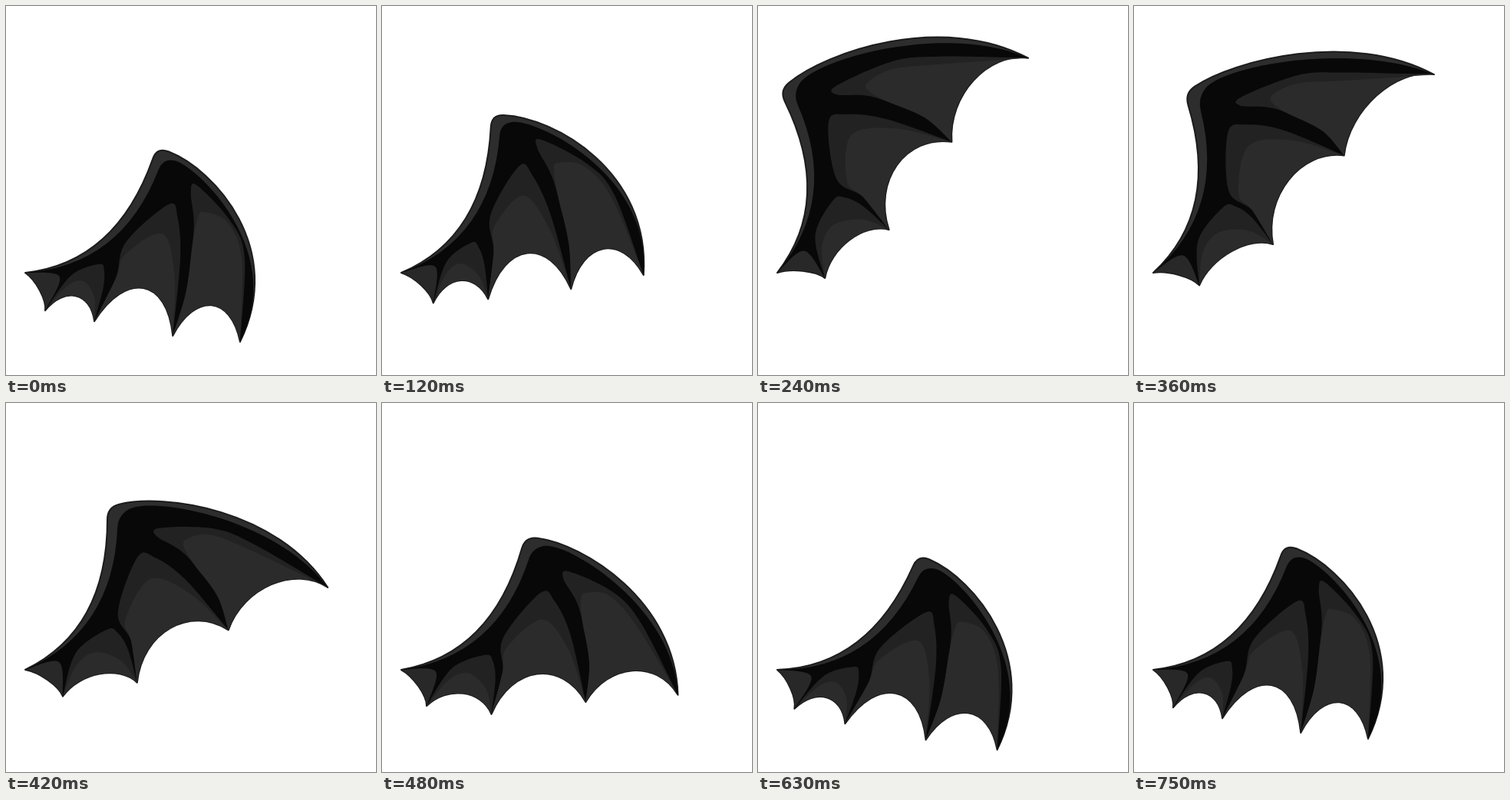
Recreate the animation shown at these times as an HTML page with a canvas. Size 482x480 px, loop 0.78 s.

```html
<!DOCTYPE html>
<html>
<head>
<meta charset="utf-8">
<style>
  html, body { margin: 0; background: #fff; overflow: hidden; }
  canvas { display: block; }
</style>
</head>
<body>
<canvas id="stage" width="482" height="480"></canvas>
<script>
const ctx = document.getElementById('stage').getContext('2d');
const root = [25, 347];
const LOOP = 780, CYCLE = 750, STEP = 30;
const BLACK = '#080808', DARK = '#222', LIGHT = '#2b2b2b', EDGE = '#2d2d2d';

// The beat has two parts: how far the wing is raised and how far it is spread
const beat = [
  { time: 0, flap: 0, spread: 0 },
  { time: 120, flap: .4, spread: -.48 },
  { time: 240, flap: 1, spread: 0 },
  { time: 360, flap: .74, spread: .78 },
  { time: 480, flap: 0, spread: 1 },
  { time: 630, flap: -.127, spread: .415 }
];

function beatAt(t, part) {
  const n = beat.length;
  const key = k => {
    const b = beat[(k + n) % n];
    return { time: b.time + Math.floor(k / n) * CYCLE, value: b[part] };
  };
  const k = beat.findLastIndex(b => b.time <= t);
  const [a, b, c, d] = [key(k - 1), key(k), key(k + 1), key(k + 2)];
  const span = c.time - b.time, u = (t - b.time) / span, rise = c.value - b.value;
  const m0 = (c.value - a.value) / (c.time - a.time) * span;
  const m1 = (d.value - b.value) / (d.time - b.time) * span;
  return b.value + u * (m0 + u * (3 * rise - 2 * m0 - m1 + u * (m0 + m1 - 2 * rise)));
}

// Weighted sum of points: mix(w1, p1, w2, p2, ...)
function mix(...terms) {
  const out = [0, 0];
  for (let i = 0; i < terms.length; i += 2) {
    out[0] += terms[i] * terms[i + 1][0];
    out[1] += terms[i] * terms[i + 1][1];
  }
  return out;
}

function unit(a, b) {
  const d = Math.hypot(b[0] - a[0], b[1] - a[1]);
  return [(b[0] - a[0]) / d, (b[1] - a[1]) / d];
}

function normal(a, b) {
  const [x, y] = unit(a, b);
  return [-y, x];
}

function polar(origin, r, degrees) {
  const a = degrees * Math.PI / 180;
  return mix(1, origin, r, [Math.cos(a), Math.sin(a)]);
}

const quad = (c, p) => ctx.quadraticCurveTo(...c, ...p);
const cubic = (c1, c2, p) => ctx.bezierCurveTo(...c1, ...c2, ...p);

function scallop(outer, inner, depth) {
  const n = normal(outer, inner), h = depth * 4 / 3;
  cubic(mix(.8, outer, .2, inner, h, n), mix(.28, outer, .72, inner, h, n), inner);
}

// Upper edge: root, rounded wrist, finger tip
function rim(arm, wrist, f1, f2, tip) {
  const bend = mix(2, arm, -.5, root, -.5, wrist);
  const c1 = mix(-5 / 6, wrist, 3, f1, -1.5, f2, 1 / 3, tip);
  const c2 = mix(1 / 3, wrist, -1.5, f1, 3, f2, -5 / 6, tip);
  ctx.moveTo(...root);
  quad(bend, mix(1, wrist, 16, unit(wrist, bend)));
  quad(wrist, mix(1, wrist, 16, unit(wrist, c1)));
  cubic(c1, c2, tip);
  return mix(.125, wrist, .375, c1, .375, c2, .125, tip);
}

function spline(pts) {
  const at = i => pts[Math.max(0, Math.min(pts.length - 1, i))];
  ctx.moveTo(...pts[0]);
  for (let i = 0; i < pts.length - 1; i++) {
    cubic(mix(1, at(i), 1 / 6, at(i + 1), -1 / 6, at(i - 1)),
      mix(1, at(i + 1), 1 / 6, at(i), -1 / 6, at(i + 2)), at(i + 1));
  }
}

function fill(color, trace) {
  ctx.beginPath();
  trace();
  ctx.closePath();
  ctx.fillStyle = color;
  ctx.fill();
}

function cell(color, inner, outer, depth, border) {
  fill(color, () => {
    spline([inner, ...border, outer]);
    scallop(outer, inner, depth);
  });
}

function draw(t) {
  const flap = beatAt(t, 'flap'), spread = beatAt(t, 'spread');
  const vary = (base, byFlap, bySpread) => base + byFlap * flap + bySpread * spread;

  // The arm turns rigidly about the root and carries the peaks of the cells
  const swing = vary(-43.6, -45.7, -3.4);
  const wrist = polar(root, 237, swing);
  const armIn = normal(root, wrist);
  const arm = mix(.55, root, .45, wrist, 36, armIn);
  const peak1 = polar(root, 45, swing + 50);
  const peak2 = polar(root, vary(97, 22, 14), swing + 37);
  const peak3 = polar(wrist, 76, swing + 122);
  const peak4 = polar(wrist, 67, swing + 91);

  const tip1 = polar(root, vary(55.6, 7, 2), vary(62.1, -55.7, -7.2));
  const tip2 = polar(root, vary(110, 46, 21), vary(35, -56, -8.8));
  const tip3 = polar(root, vary(209, 75, 35), vary(23.1, -59.9, -13.2));
  const tip4 = polar(root, vary(294, 136, 68), vary(17.8, -58.3, -12.6));
  const slack = vary(1, -.25, -.18);
  const [d1, d2, d3, d4] = [6, 27 * slack, 54 * slack, 44 * slack];

  const fingerIn = normal(wrist, tip4), bulge = vary(54, -15, -10);
  const f1 = mix(.72, wrist, .28, tip4, -.9 * bulge, fingerIn);
  const f2 = mix(.355, wrist, .645, tip4, -1.08 * bulge, fingerIn);

  const hem = () => {
    scallop(tip4, tip3, d4);
    scallop(tip3, tip2, d3);
    scallop(tip2, tip1, d2);
    scallop(tip1, root, d1);
  };

  ctx.clearRect(0, 0, 482, 480);
  let finger;
  fill(EDGE, () => { finger = rim(arm, wrist, f1, f2, tip4); hem(); });
  ctx.strokeStyle = '#1c1c1c';
  ctx.lineWidth = 2;
  ctx.lineJoin = 'round';
  ctx.stroke();
  fill(BLACK, () => {
    rim(mix(1, arm, 8, armIn), mix(1, wrist, 17, armIn, 4, fingerIn),
      mix(1, f1, 8, fingerIn), mix(1, f2, vary(4, 4, 2), fingerIn), tip4);
    hem();
  });

  // Point placed by its share towards the peak and towards the outer tip
  const within = (inner, outer, peak) => (a, c) => mix(1 - a - c, inner, a, peak, c, outer);

  const gap = vary(10, 15, 7);
  const along = k => [mix(1, finger, gap * k, fingerIn), mix(1, f2, gap * k, fingerIn)];
  const p = within(tip3, tip4, peak4);
  cell(DARK, tip3, tip4, d4, [p(.3, .115), p(.72, .11), p(.95, 0), p(1, .08), ...along(1)]);
  cell(LIGHT, tip3, tip4, d4, [p(.3, .115), p(.62, .12), p(.79, .15), p(.83, .23), ...along(1.4)]);

  const m = within(tip2, tip3, peak3);
  cell(DARK, tip2, tip3, d3, [m(.356, -.066), m(.649, -.213), m(1, 0), m(.91, .2), m(.597, .53)]);
  cell(LIGHT, tip2, tip3, d3, [m(.356, -.066), m(.56, -.13), m(.766, .142), m(.47, .576)]);

  const q = within(tip1, tip2, peak2);
  cell(DARK, tip1, tip2, d2, [q(.7, -.24), q(1, 0), q(.91, .2), q(.6, .52)]);
  cell(LIGHT, tip1, tip2, d2, [q(.487, -.106), q(.65, .058), q(.42, .538)]);

  cell('#282828', root, tip1, d1, [peak1]);
}

function frame() {
  const t = Math.floor(performance.now() % LOOP / STEP) * STEP;
  draw(t % CYCLE);
  requestAnimationFrame(frame);
}
frame();
</script>
</body>
</html>
```
